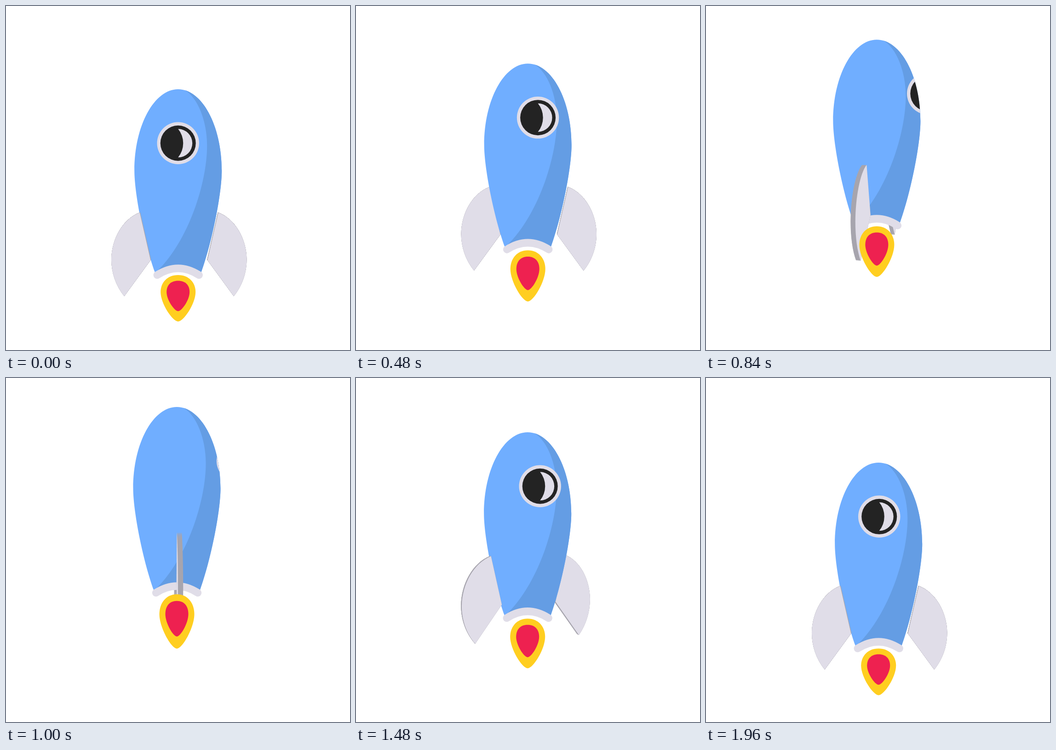
An HTML page with a canvas for the animation above (2 s loop, 748 by 748 pixels).

```html
<!DOCTYPE html>
<html lang="en">
<head>
<meta charset="utf-8">
<title>Rocket</title>
<style>
html, body { margin: 0; width: 100%; height: 100%; overflow: hidden; background: #fff; }
canvas { display: block; }
</style>
</head>
<body>
<canvas id="stage" width="748" height="748"></canvas>
<script>
const ctx = document.getElementById('stage').getContext('2d');
const LOOP = 2000, STEP = 40;
const PALE = '#e0dde8', GREY = '#a7a5ae';

// Local space: x = 0 is the rocket's axis, y = 0 its nose.
const body = new Path2D('M0 0C52 0 95 79 95 177C95 225 75 330 50 399Q0 372 -50 399C-75 330 -95 225 -95 177C-95 79 -52 0 0 0Z');
const shade = new Path2D('M15 2C42 18 63 68 63 122C63 205 22 330 -45 395L-45 420H120V-5H15Z');
const collar = new Path2D('M-45.5 404Q0 375 45.5 404');
const crescent = new Path2D('M0 -31A31 31 0 0 1 0 31A49 49 0 0 0 0 -31Z');
const outerFlame = new Path2D('M0 404C23 404 38 420 38 441C38 466 12 505 0 505C-12 505 -38 466 -38 441C-38 420 -23 404 0 404Z');
const innerFlame = new Path2D('M0 416.5C16 416.5 25 426 25 441C25 458 8 482.5 0 482.5C-8 482.5 -25 458 -25 441C-25 426 -16 416.5 0 416.5Z');

// Fin outline as [radius, y]: start, two cubic curves, inner corner.
const finShape = [[85, 268], [122, 282], [146, 325], [146.5, 369],
  [146.5, 398], [137, 426], [118.5, 449], [61.5, 371]];
const FIN_X = 2, EYE_Y = 224, DEPTH = 914, HALF_THICK = 4.75;

// Keys are [time, value]
const finAngle = [[0, 0], [280, -13], [560, 9], [680, 37], [1000, 92], [1280, 40], [1480, 19], [1680, 8], [1960, 0], [2000, 0]];
const windowX = [[0, 0], [280, -18], [680, 72], [1000, 132], [1280, 57], [1480, 27], [1960, 1.5], [2000, 0]];
const shakeX = [[0, .2], [280, 1], [680, -1.8], [1000, -2.5], [1280, 2.5], [1480, -.8], [1960, 1.2], [2000, .2]];
const shakeY = [[0, -3.5], [280, -2.4], [560, -1], [680, 5], [1000, .5], [1280, .5], [1480, -1.7], [1960, 0], [2000, -3.5]];

// Smooth curve through the keys, flat at both ends
function track(keys, t) {
  const slope = k => k < 1 || k > keys.length - 2 ? 0
    : (keys[k + 1][1] - keys[k - 1][1]) / (keys[k + 1][0] - keys[k - 1][0]);
  let i = 0;
  while (i < keys.length - 2 && t >= keys[i + 1][0]) i++;
  const [t0, a] = keys[i], [t1, b] = keys[i + 1];
  const span = t1 - t0, u = (t - t0) / span, v = 1 - u;
  return v * v * (1 + 2 * u) * a + u * u * (3 - 2 * u) * b
    + span * u * v * (v * slope(i) - u * slope(i + 1));
}

function fill(path, color) {
  ctx.fillStyle = color;
  ctx.fill(path);
}

function disc(radius, color) {
  ctx.fillStyle = color;
  ctx.beginPath();
  ctx.arc(0, 0, radius, 0, 2 * Math.PI);
  ctx.fill();
}

// One slice of a fin, offset from its middle plane, seen in perspective
function finSlice(side, angle, offset, color) {
  const c = Math.cos(angle), s = Math.sin(angle);
  const p = finShape.map(([r, y]) => {
    const x = side * r * c + offset * s;
    const z = -side * r * s + offset * c;
    const k = DEPTH / (DEPTH - z);
    return [FIN_X + x * k, EYE_Y + (y - EYE_Y) * k];
  });
  ctx.fillStyle = color;
  ctx.beginPath();
  ctx.moveTo(...p[0]);
  ctx.bezierCurveTo(...p[1], ...p[2], ...p[3]);
  ctx.bezierCurveTo(...p[4], ...p[5], ...p[6]);
  ctx.lineTo(...p[7]);
  ctx.closePath();
  ctx.fill();
}

function fin(side, angle) {
  const near = Math.cos(angle) >= 0 ? HALF_THICK : -HALF_THICK;
  for (let k = -1; k < 1; k += 0.1) finSlice(side, angle, near * k, GREY);
  finSlice(side, angle, near, PALE);
}

function hull(portX) {
  ctx.save();
  fill(body, '#70aeff');
  ctx.clip(body);
  fill(shade, '#649de4');
  ctx.translate(portX, 117.3);
  disc(45.7, PALE);
  disc(38.5, '#232323');
  fill(crescent, PALE);
  ctx.restore();
  ctx.strokeStyle = PALE;
  ctx.lineWidth = 16.5;
  ctx.lineCap = 'round';
  ctx.stroke(collar);
}

function flame(stretch) {
  ctx.save();
  ctx.translate(0, 385);
  ctx.scale(1, stretch);
  ctx.translate(0, -385);
  fill(outerFlame, '#ffce20');
  fill(innerFlame, '#ee2150');
  ctx.restore();
}

function draw(t) {
  const turn = 2 * Math.PI * t / LOOP;
  const angle = track(finAngle, t) * Math.PI / 180;
  const inFront = side => side * Math.sin(angle) <= 1e-6;
  const sides = [-1, 1];

  ctx.clearRect(0, 0, 748, 748);
  ctx.save();
  ctx.translate(374 + track(shakeX, t), 123.5 + 61 * Math.cos(turn) + track(shakeY, t));
  sides.filter(s => !inFront(s)).forEach(s => fin(s, angle));
  hull(track(windowX, t));
  sides.filter(inFront).forEach(s => fin(s, angle));
  flame(1 + 0.085 * (1 - Math.cos(3 * turn)));
  ctx.restore();
}

const start = performance.now();
function tick() {
  const t = (performance.now() - start) % LOOP;
  draw(Math.floor(t / STEP) * STEP);
  requestAnimationFrame(tick);
}
tick();
</script>
</body>
</html>
```
